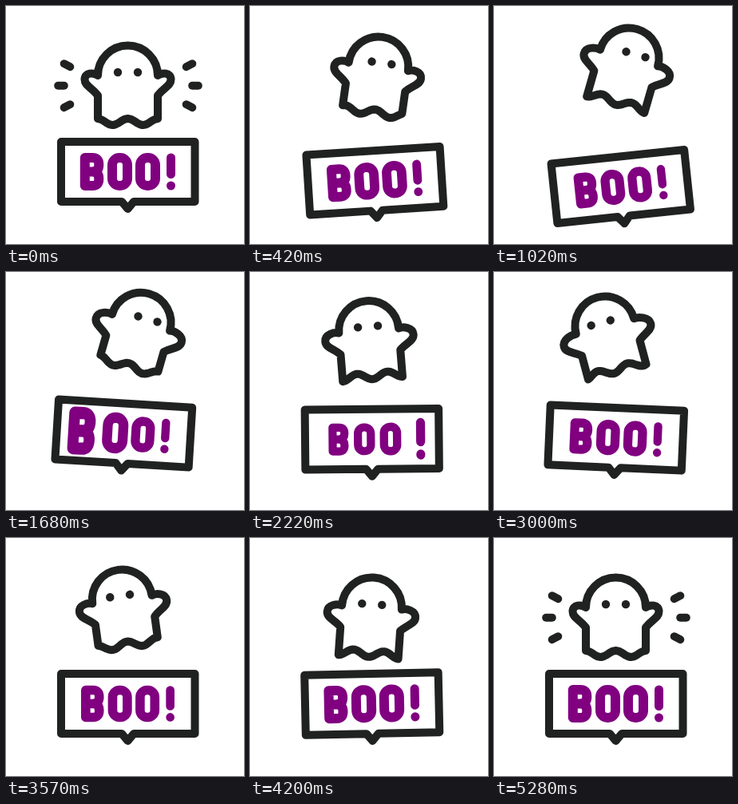
Animation, 298 px wide and 298 px high, one loop 5.4 s. Source, as an HTML page:

```html
<!DOCTYPE html>
<html lang="en">
<head>
<meta charset="utf-8">
<title>Boo</title>
<style>
html, body { margin: 0; width: 100%; height: 100%; overflow: hidden; background: #fff; }
svg { display: block; width: 100vw; height: 100vh; }
.ink { fill: none; stroke: #202121; stroke-width: 10; stroke-linecap: round; stroke-linejoin: round; }
.dot { fill: #202121; }
#word { fill: none; stroke: #800080; stroke-width: 12; stroke-linecap: round; stroke-linejoin: round; }
</style>
</head>
<body>
<svg viewBox="0 0 298 298" role="img" aria-label="BOO!">
  <g id="rays" class="ink"></g>
  <g id="ghost">
    <path id="body" class="ink"/>
    <g id="eyes" class="dot"><circle cx="-12.5" cy="-4" r="5.2"/><circle cx="12.5" cy="-4" r="5.2"/></g>
  </g>
  <g id="sign">
    <path class="ink" d="M-83.5-37.5H84V37.5H7.5L0 46.5L-7.5 37.5H-83.5Z"/>
    <g id="word">
      <path d="M-8.5-17.5H1Q9-17.5 9-9Q9-1 2 0Q9 1 9 9Q9 17.5 1 17.5H-8.5ZM-8.5 0H1"/>
      <rect x="-9.5" y="-17.5" width="19" height="35" rx="9"/>
      <rect x="-9.5" y="-17.5" width="19" height="35" rx="9"/>
      <path d="M0-17.5V3M0 17.5V17.6" stroke-width="11"/>
    </g>
  </g>
</svg>
<script>
const LOOP = 5400, STEP = 30;
const $ = id => document.getElementById(id);
const letters = [...$('word').children];
const home = [-45.2, -10, 25, 54];
const hemTurns = [180, 1020, 1680, 2220, 2640, 3160, 3650, 4200, 5280];

// Smooth rise from 0 to 1, and a smooth hump that returns to 0.
const unit = (t, a, b) => Math.min(1, Math.max(0, (t - a) / (b - a)));
const ramp = (t, a, b) => { const u = unit(t, a, b); return u * u * (3 - 2 * u); };
const bump = (t, a, b) => Math.sin(Math.PI * unit(t, a, b)) ** 2;

const place = (el, x, y, turn = 0, sx = 1, sy = sx) =>
  el.setAttribute('transform', `translate(${x} ${y}) rotate(${turn}) scale(${sx} ${sy})`);

function ghostPath(drop, length, beat) {
  const tip = 54 + drop / 3, side = 25 + drop / 2;
  const hem = [];
  for (let x = 37.5; x >= -37.5; x -= 2.5) {
    const y = length - 4 * Math.cos(2 * Math.PI * x / 38 - Math.PI * beat);
    hem.push(`L${x} ${y.toFixed(2)}`);
  }
  return `M-37.5 0A37.5 37.5 0 0 1 37.5 0`
    + `C43 ${drop / 2 - 4} ${tip} ${drop - 4} ${tip} ${5 + drop}`
    + `C${tip} ${13 + drop} 45 ${15 + drop} 37.5 ${side}`
    + hem.join('')
    + `L-37.5 ${side}C-45 ${15 + drop} ${-tip} ${13 + drop} ${-tip} ${5 + drop}`
    + `C${-tip} ${drop - 4} -43 ${drop / 2 - 4} -37.5 0Z`;
}

// Leans up to the right, swings to the left, then settles at home.
function drawGhost(t) {
  const right = ramp(t, 180, 660) - ramp(t, 1830, 2365);
  const left = ramp(t, 1850, 2590) - ramp(t, 3030, 4150);
  const settle = bump(t, 3750, 4700);
  const hop = bump(t, 1020, 1980);
  const x = 16.5 * right - 13.5 * left;
  const y = -22 * right - 19 * left - 2.5 * hop;
  place($('ghost'), 152.5 + x, 87 + y, 16 * right - 15 * left + 4 * settle);
  place($('eyes'), 7 * right - 4 * left, -2.5 * right - 1.5 * left);

  const beat = hemTurns.slice(1).reduce((sum, end, i) => sum + ramp(t, hemTurns[i], end), 0);
  const drop = 5 * right + 6.5 * left + 4 * settle;
  $('body').setAttribute('d', ghostPath(drop, 58 - right - 2 * left, beat));
}

// Drops tilted, is thrown up the other way, then rocks to rest.
function drawSign(t) {
  const low = ramp(t, 180, 600) - ramp(t, 1260, 1640);
  const high = bump(t, 1420, 2180);
  const dip = bump(t, 2120, 2760);
  const rock = bump(t, 2600, 3400) - bump(t, 3700, 4700) / 2;
  place($('sign'),
    152.5 + 6 * low - 7 * high,
    207.5 + 18.5 * low - 7 * high + 8 * dip,
    -6 * low + 4.5 * high - 2.5 * dip + 2.5 * rock);
}

// The word tightens a little while a swell runs through it.
function drawWord(t) {
  const shrink = 0.06 * (ramp(t, 180, 1020) - ramp(t, 3000, 4200)) + 0.09 * bump(t, 1820, 2620);
  letters.forEach((el, i) => {
    const pulse = Math.exp(-(((t - 1640 - 170 * i) / 140) ** 2));
    const x = home[i] * (1 - shrink / 2) + 8 * (i - 1.2) * pulse;
    place(el, x, 0, 0, 1 - shrink + 0.22 * pulse, 1 - shrink + 0.36 * pulse);
  });
}

const rays = [];
for (const side of [-1, 1]) {
  for (const row of [-1, 0, 1]) {
    const el = document.createElementNS('http://www.w3.org/2000/svg', 'path');
    const rise = row * 2;
    el.setAttribute('d', `M${-3.8 * side} ${-rise}L${3.8 * side} ${rise}`);
    $('rays').append(el);
    rays.push({ el, x: 153 + side * (row ? 76.5 : 84), y: 99.7 + row * 25.5 });
  }
}

function drawRays(t) {
  const size = 1 - ramp(t, 180, 420) + ramp(t, 4420, 4700) - 0.1 * bump(t, 4700, 5250);
  $('rays').style.display = size > 0.01 ? '' : 'none';
  for (const r of rays) place(r.el, r.x, r.y, 0, size);
}

const start = performance.now();
function tick() {
  const now = (performance.now() - start) % LOOP;
  const t = Math.floor(now / STEP) * STEP;
  for (const draw of [drawGhost, drawSign, drawWord, drawRays]) draw(t);
  requestAnimationFrame(tick);
}
tick();
</script>
</body>
</html>
```
